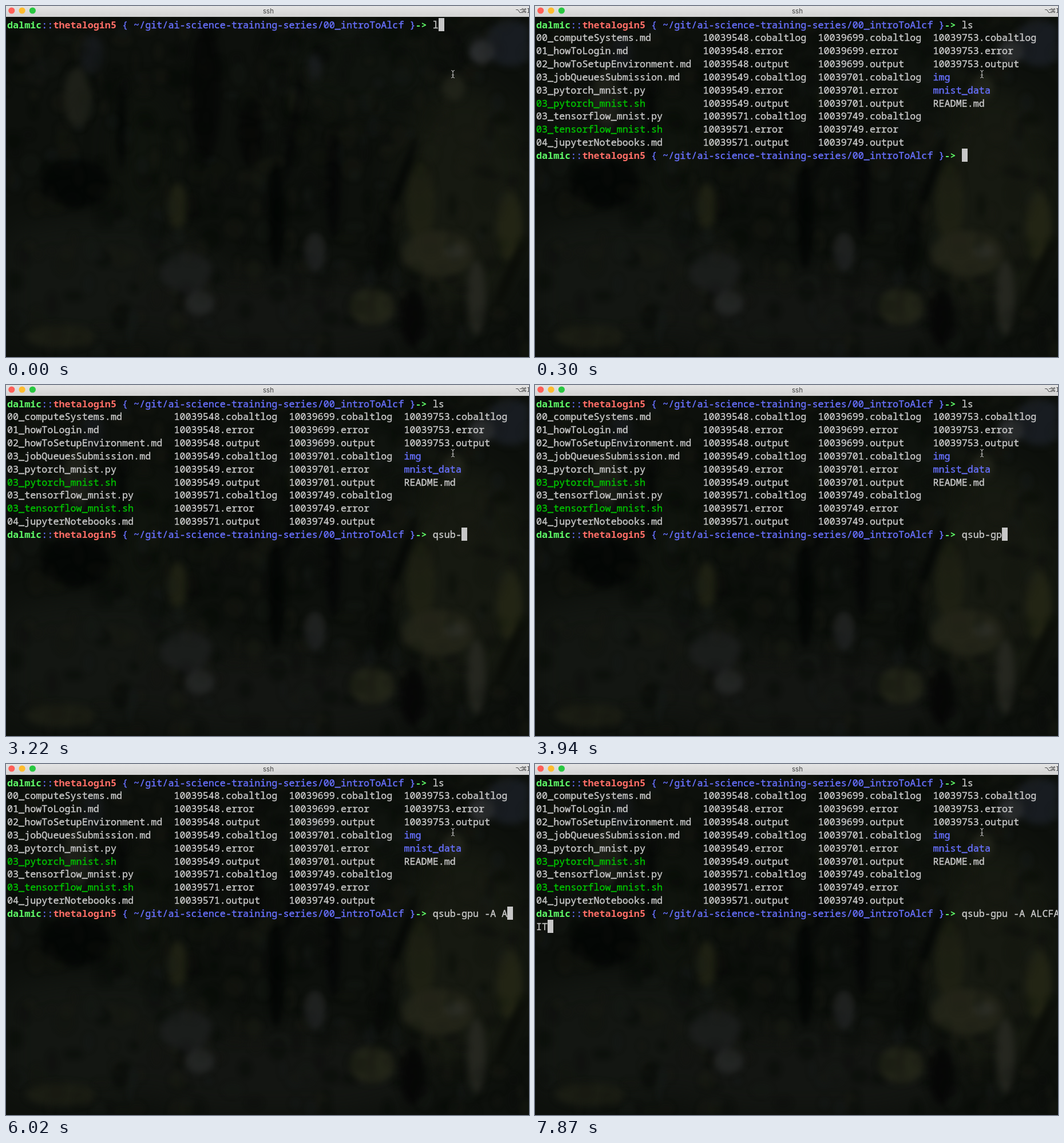
These frames come from a looping animation (914 px wide and 613 px high, 8 s). An HTML page with a canvas:

```html
<!DOCTYPE html>
<html lang="en">
<head>
<meta charset="utf-8">
<title>ssh</title>
<style>
html, body { margin: 0; width: 100%; height: 100%; overflow: hidden; background: #0b0d0a; }
canvas { display: block; }
</style>
</head>
<body>
<canvas id="stage" width="914" height="613"></canvas>
<script>
const W = 914, H = 613, LOOP = 8000;
const COL = 10.05, ROW = 22.84, LEFT = 2, TOP = 21;
const PROMPT_COLS = 74, COLS = 91;
const GRAY = '#c7c7c7', GREEN = '#5ffa68', BLUE = '#6871ff', RED = '#ff6e67', SCRIPT = '#00c200';
const MONO = '16.75px "Noto Sans Mono", "DejaVu Sans Mono", monospace';
const ctx = document.getElementById('stage').getContext('2d');

const files = [
  ['00_computeSystems.md', '10039548.cobaltlog', '10039699.cobaltlog', '10039753.cobaltlog'],
  ['01_howToLogin.md', '10039548.error', '10039699.error', '10039753.error'],
  ['02_howToSetupEnvironment.md', '10039548.output', '10039699.output', '10039753.output'],
  ['03_jobQueuesSubmission.md', '10039549.cobaltlog', '10039701.cobaltlog', 'img'],
  ['03_pytorch_mnist.py', '10039549.error', '10039701.error', 'mnist_data'],
  ['03_pytorch_mnist.sh', '10039549.output', '10039701.output', 'README.md'],
  ['03_tensorflow_mnist.py', '10039571.cobaltlog', '10039749.cobaltlog'],
  ['03_tensorflow_mnist.sh', '10039571.error', '10039749.error'],
  ['04_jupyterNotebooks.md', '10039571.output', '10039749.output']
];
const fileCols = [0, 29, 49, 69];

// Time at which each character of the command appears
const command = 'qsub-gpu -A ALCFAIT';
const keyTimes = [2460, 2700, 2870, 2990, 3220, 3820, 3940, 4590, 5010, 5310,
  5540, 5840, 6020, 6560, 6560, 6860, 7210, 7330, 7870];

function makeCanvas(paint) {
  const c = document.createElement('canvas');
  c.width = W;
  c.height = H;
  paint(c.getContext('2d'));
  return c;
}

function blob(g, x, y, rx, ry, color, tilt = 0) {
  g.fillStyle = color;
  g.beginPath();
  g.ellipse(x, y, rx, ry, tilt, 0, 7);
  g.fill();
}

// Soft woodland backdrop
function paintGround(g) {
  blob(g, 150, 480, 230, 110, '#151813');
  blob(g, 480, 540, 260, 80, '#141713');
  blob(g, 800, 340, 120, 200, '#181b12');
  blob(g, 620, 110, 130, 80, '#10140f');
  blob(g, 240, 260, 50, 110, '#10140e');
}

function paintLights(g) {
  blob(g, 125, 160, 24, 52, '#20221a');
  blob(g, 150, 85, 20, 35, '#171a1c');
  blob(g, 882, 65, 45, 40, '#1a1f24');
  blob(g, 831, 80, 21, 21, '#303235');
  blob(g, 782, 142, 20, 24, '#22241a');
  blob(g, 540, 105, 12, 22, '#1b1f21');
  blob(g, 505, 168, 11, 20, '#212318');
  blob(g, 300, 350, 17, 40, '#212314');
  blob(g, 315, 465, 45, 35, '#1c1e1d');
  blob(g, 338, 518, 26, 22, '#252726');
  blob(g, 540, 430, 18, 34, '#222424');
  blob(g, 725, 345, 24, 75, '#202215');
  blob(g, 755, 432, 63, 40, '#25261a');
  blob(g, 786, 428, 20, 11, '#303129');
  blob(g, 822, 510, 16, 65, '#272822');
  blob(g, 880, 385, 22, 60, '#242616');
  blob(g, 640, 525, 40, 32, '#242619');
  blob(g, 95, 577, 60, 20, '#1c1e14');
}

function paintTrunks(g) {
  blob(g, 122, 310, 60, 42, '#040605');
  blob(g, 350, 150, 26, 120, '#060807');
  blob(g, 428, 220, 22, 60, '#060807');
  blob(g, 202, 210, 8, 75, '#040605');
  blob(g, 472, 365, 14, 95, '#030504');
  blob(g, 503, 210, 7, 100, '#050706', 0.15);
  blob(g, 572, 310, 13, 95, '#050706');
  blob(g, 692, 300, 8, 75, '#040605', 0.35);
  blob(g, 660, 410, 12, 65, '#080a08', 0.15);
  blob(g, 710, 545, 22, 50, '#060706');
  blob(g, 880, 470, 10, 60, '#0a0c08', 0.4);
}

function paintLeaves(g) {
  let seed = 11;
  const rnd = () => (seed = seed * 16807 % 2147483647) / 2147483647;
  const tones = ['#070907', '#0b0e0a', '#161911', '#1b1d14', '#191c1a'];
  g.globalAlpha = 0.45;
  for (let i = 0; i < 520; i++) {
    blob(g, rnd() * W, rnd() * H, 5 + rnd() * 14, 6 + rnd() * 16, tones[Math.floor(rnd() * 5)]);
  }
  g.globalAlpha = 1;
}

const backdrop = makeCanvas(g => {
  g.fillStyle = '#0d100c';
  g.fillRect(0, 0, W, H);
  const layers = [[paintGround, 24, 0.9], [paintLeaves, 4, 0.6], [paintLights, 6, 0.9],
    [paintTrunks, 6, 0.85], [paintLeaves, 3, 0.25]];
  for (const [paint, blur, alpha] of layers) {
    g.filter = `blur(${blur}px)`;
    g.globalAlpha = alpha;
    g.drawImage(makeCanvas(paint), 0, 0);
  }
});

function write(text, col, row, color = GRAY, bold = false) {
  ctx.font = (bold ? 'bold ' : '') + MONO;
  ctx.fillStyle = ctx.strokeStyle = color;
  ctx.lineWidth = 0.4;
  ctx.textAlign = 'left';
  const y = Math.round(TOP + 17.5 + row * ROW);
  [...text].forEach((ch, i) => {
    const x = LEFT + (col + i) * COL;
    ctx.fillText(ch, x, y);
    if (!bold) ctx.strokeText(ch, x, y); // medium weight
  });
}

function prompt(row) {
  const parts = [['dalmic', GREEN, true], ['::', BLUE], ['thetalogin5', RED, true],
    [' { ~/git/ai-science-training-series/00_introToAlcf }', BLUE], ['->', GREEN, true]];
  let col = 0;
  for (const [text, color, bold] of parts) {
    write(text, col, row, color, bold);
    col += text.length;
  }
}

function cursor(col, row) {
  ctx.fillStyle = GRAY;
  ctx.fillRect(Math.round(LEFT + col * COL), Math.round(TOP + row * ROW), 10, 23);
}

function listing() {
  files.forEach((names, r) => names.forEach((name, c) => {
    const color = !name.includes('.') ? BLUE : name.endsWith('.sh') ? SCRIPT : GRAY;
    write(name, fileCols[c], r + 1, color);
  }));
}

function titleBar() {
  const shade = ctx.createLinearGradient(0, 0, 0, 19);
  shade.addColorStop(0, '#e4e4e4');
  shade.addColorStop(1, '#d2d2d2');
  ctx.fillStyle = shade;
  ctx.fillRect(0, 0, W, 19);
  ['#ff5f57', '#febc2e', '#28c840'].forEach((color, i) => blob(ctx, 9.8 + i * 18.3, 8, 5.6, 5.6, color));
  ctx.fillStyle = '#414141';
  ctx.textAlign = 'center';
  ctx.font = '11.5px Inter, sans-serif';
  ctx.fillText('ssh', 458.5, 13);
  ctx.textAlign = 'left';
  ctx.font = '10.5px "DejaVu Sans", sans-serif';
  ctx.fillText('⌥', 890, 12);
  ctx.fillText('⌘', 900, 12);
  ctx.fillText('1', 910, 12);
}

function pointer() {
  ctx.strokeStyle = '#c4c4c4';
  ctx.lineWidth = 1;
  ctx.beginPath();
  ctx.moveTo(778, 112.5);
  ctx.quadraticCurveTo(781, 112.5, 781, 115);
  ctx.quadraticCurveTo(781, 112.5, 784, 112.5);
  ctx.moveTo(781, 114);
  ctx.lineTo(781, 124);
  ctx.moveTo(778, 125.5);
  ctx.quadraticCurveTo(781, 125.5, 781, 123);
  ctx.quadraticCurveTo(781, 125.5, 784, 125.5);
  ctx.moveTo(779, 120.5);
  ctx.lineTo(783, 120.5);
  ctx.stroke();
}

function draw(t) {
  ctx.drawImage(backdrop, 0, 0);
  titleBar();
  prompt(0);
  write(t < 120 ? 'l' : 'ls', PROMPT_COLS, 0);
  if (t < 300) {
    cursor(PROMPT_COLS + (t < 120 ? 1 : 2), 0);
  } else {
    listing();
    prompt(10);
    const typed = keyTimes.filter(k => t >= k).length;
    const room = COLS - PROMPT_COLS;
    write(command.slice(0, Math.min(typed, room)), PROMPT_COLS, 10);
    write(command.slice(room, Math.max(typed, room)), 0, 11);
    const end = PROMPT_COLS + typed;
    cursor(end % COLS, 10 + Math.floor(end / COLS));
  }
  pointer();
}

const start = performance.now();
function frame() {
  draw((performance.now() - start) % LOOP);
  requestAnimationFrame(frame);
}
frame();
</script>
</body>
</html>
```
